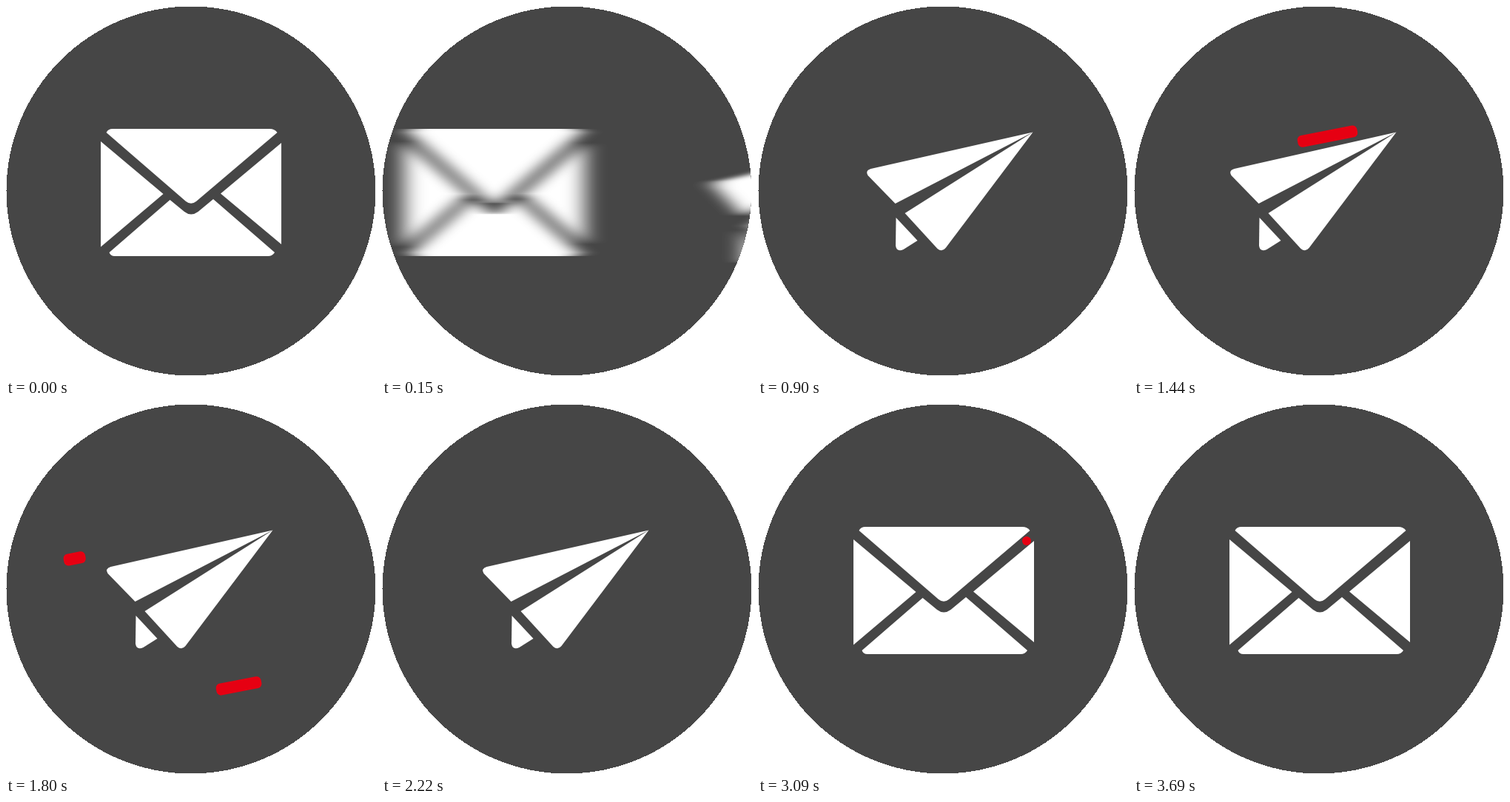
These frames come from a looping animation (500 by 500 pixels, 4.11 s). An HTML page:

```html
<!DOCTYPE html>
<html lang="en">
<head>
<meta charset="utf-8">
<title>Paper plane mail</title>
<style>
html, body { margin: 0; width: 100%; height: 100%; overflow: hidden; background: #fff; }
svg { display: block; width: 100vw; height: 100vh; }
</style>
</head>
<body>
<svg viewBox="0 0 500 500">
  <defs>
    <clipPath id="disc"><circle cx="250" cy="250" r="249.5"/></clipPath>
    <filter id="smear" filterUnits="userSpaceOnUse" x="-500" y="0" width="1500" height="500" color-interpolation-filters="sRGB">
      <feGaussianBlur id="blur" stdDeviation="0 0"/>
    </filter>
  </defs>
  <circle cx="250" cy="250" r="249.5" fill="#464646" shape-rendering="crispEdges"/>
  <g clip-path="url(#disc)">
    <g id="dashes" fill="#e60012"></g>
    <g id="slide" fill="#fff">
      <g id="mail">
        <path d="M145 166H357Q364 166 367.5 171L258 264Q251 269.500 244 264L136.500 171Q139 166 145 166Z"/>
        <path d="M129 183L213.500 254L129 325.500Z"/>
        <path d="M373 185L291 253.500L373 322Z"/>
        <path d="M222.500 262L242 278Q251 285 260.500 278L281 261L364 333Q361 338 355 338H148Q142 338 140.500 333Z"/>
      </g>
      <g id="plane">
        <path d="M372 170.500L153 220Q145 222.500 149 229L186 267Z"/>
        <path d="M372 170.500L199 280L243 328Q249 333 254 327Z"/>
        <path d="M187 286L216 317L197 329Q188 333 186.500 324Z"/>
      </g>
    </g>
    <circle id="badge" cx="363" cy="185" r="0" fill="#e60012"/>
  </g>
</svg>
<script>
const LOOP = 4110, STEP = 30, HOLD = 3690, WIDTH = 400, SLIDE = 480;
const $ = id => document.getElementById(id);
const clamp = (v, lo, hi) => Math.min(hi, Math.max(lo, v));

const easeInOut = p => p < 0.5 ? 4 * p ** 3 : 1 - 4 * (1 - p) ** 3;
const slideAt = (t, start) => WIDTH * easeInOut(clamp((t - start) / SLIDE, 0, 1));
const first = t => slideAt(t, -40);
const second = t => slideAt(t, 2537);

// Keys are [time, value] pairs joined by cosine easing.
function track(keys, t) {
  if (t <= keys[0][0]) return keys[0][1];
  for (let i = 1; i < keys.length; i++) {
    const [a, from] = keys[i - 1], [b, to] = keys[i];
    if (t < b) return from + (to - from) * (1 - Math.cos(Math.PI * (t - a) / (b - a))) / 2;
  }
  return keys[keys.length - 1][1];
}

const planeX = [[800, 2], [1270, -21], [1680, -11.5], [2240, -11.5], [2560, -7.5]];
const planeY = [[420, 17], [740, -8], [900, 0], [2220, 0], [2420, -6], [2670, 16.5]];
const badgeR = [[3020, 0], [3330, 50.5], [3690, 0]];

const DASH = 82, THICK = 16, TILT = -11;
const dashes = [
  { x: 401, y: 149, start: 1107, speed: 0.55, run: 329 },
  { x: 330, y: 430, start: 1110, speed: 0.9, run: 185 },
  { x: 345, y: 375, start: 1700, speed: 0.62, run: 220 }
];
for (const d of dashes) {
  d.el = document.createElementNS("http://www.w3.org/2000/svg", "rect");
  d.el.setAttribute("transform", `translate(${d.x} ${d.y}) rotate(${TILT})`);
  d.el.setAttribute("y", -THICK / 2);
  d.el.setAttribute("height", THICK);
  d.el.setAttribute("rx", 6);
  $("dashes").append(d.el);
}

function move(id, x, y) {
  $(id).setAttribute("transform", `translate(${x.toFixed(2)} ${y.toFixed(2)})`);
}

function draw(ms) {
  const t = Math.min(HOLD, Math.floor((ms % LOOP) / STEP) * STEP);
  const out = first(t), back = second(t);

  move("mail", t < 1500 ? -out : WIDTH - back, 0);
  move("plane", WIDTH - out - back + track(planeX, t), track(planeY, t));

  // Horizontal smear as long as the travel within one step.
  const total = u => first(u) + second(u);
  const sigma = (total(t + STEP / 2) - total(t - STEP / 2)) / 3.46;
  $("blur").setAttribute("stdDeviation", `${sigma.toFixed(2)} 0`);
  if (sigma > 1) $("slide").setAttribute("filter", "url(#smear)");
  else $("slide").removeAttribute("filter");

  for (const d of dashes) {
    const way = (t - d.start) * d.speed;
    const head = clamp(way, 0, d.run), tail = clamp(way - DASH, 0, d.run);
    d.el.setAttribute("x", -head);
    d.el.setAttribute("width", head - tail);
  }
  $("badge").setAttribute("r", track(badgeR, t).toFixed(2));
}

const begin = performance.now();
function tick() {
  draw(performance.now() - begin);
  requestAnimationFrame(tick);
}
draw(0);
requestAnimationFrame(tick);
</script>
</body>
</html>
```
